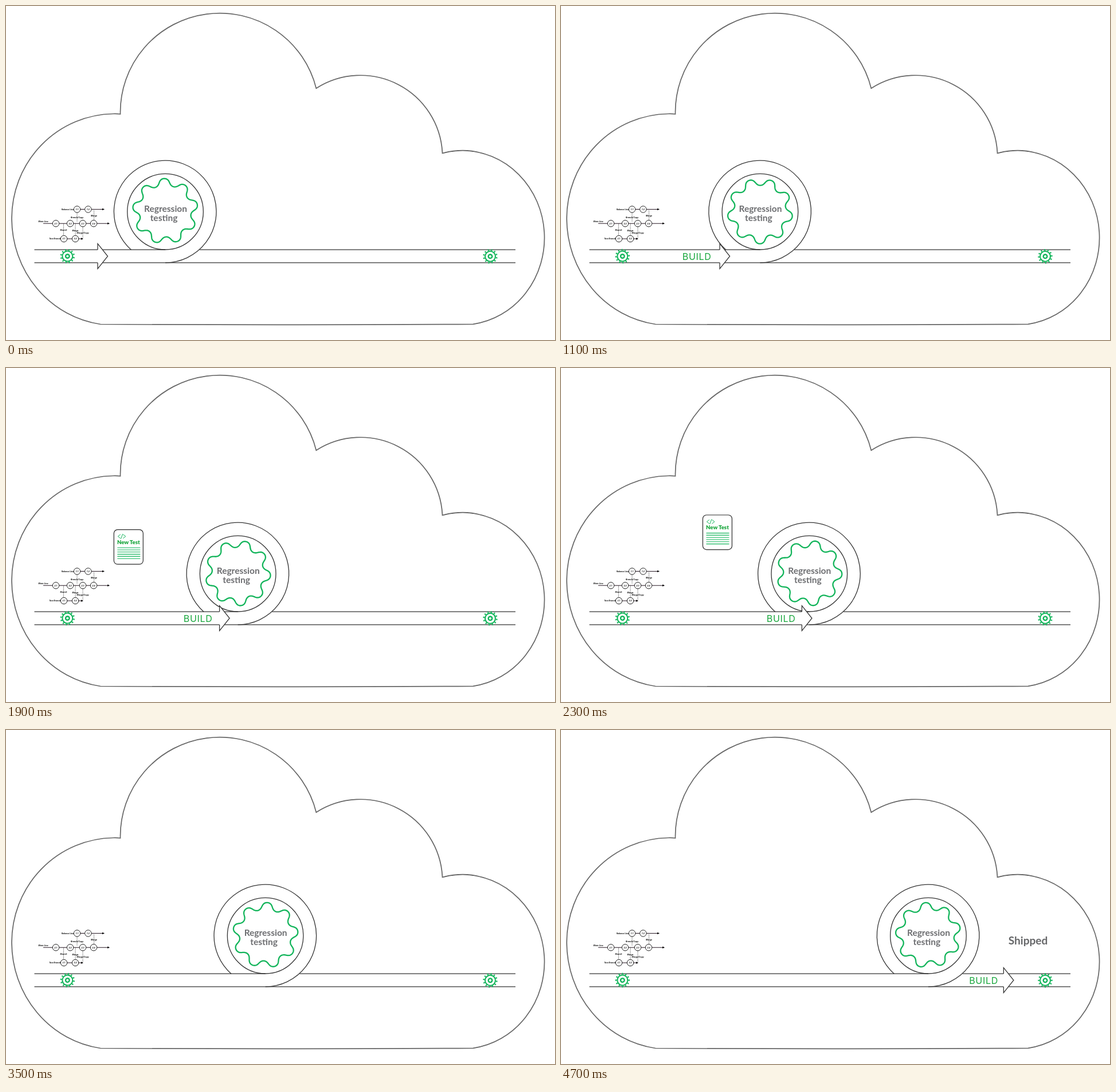
An HTML page that plays this animation: 958 px wide and 584 px high, repeating every 4800 ms.

```html
<!DOCTYPE html>
<html lang="en">
<head>
<meta charset="utf-8">
<title>Build pipeline</title>
<style>
  html, body { margin: 0; width: 100%; height: 100%; overflow: hidden; background: #fff; }
  svg { display: block; width: 958px; height: 584px; }
  .line { fill: none; stroke: #333; stroke-width: 1.3; }
  .cloud { fill: none; stroke: #666; stroke-width: 1.7; }
  .green { fill: none; stroke: #12b45a; }
  .label { font: 700 15.5px Lato, sans-serif; fill: #6d6e71; text-anchor: middle; }
  .shipped { font-size: 19px; fill: #666769; }
  .build { font: 400 16px Inter, sans-serif; letter-spacing: .7px; fill: #18a63c; }
  .tiny { font: italic 700 3.7px "Open Sans", sans-serif; fill: #111; text-anchor: middle; }
  .title { font: 900 9.6px Lato, sans-serif; fill: #18a63c; text-anchor: middle; }
</style>
</head>
<body>
<svg viewBox="0 0 958 584">
  <defs>
    <g id="cog" class="green">
      <circle r="9" stroke-width="2.1"/>
      <circle r="3.3" stroke-width="2.4"/>
      <circle r="11.3" stroke-width="2.8" pathLength="120" stroke-dasharray="3.4 6.6" stroke-dashoffset="-3.3"/>
    </g>
    <g id="doc">
      <rect x="-25.5" y="-30.3" width="51" height="60.6" rx="6.5" fill="#fff" stroke="#2a2a2a" stroke-width="1.2"/>
      <path class="green" d="M-14-22l-4.5 3.5 4.5 3.5M-13.2-14.3l3-8.4M-9.5-22l4.5 3.5-4.5 3.5"/>
      <text class="title" y="-5">New Test</text>
      <path class="green" d="M-19.5 1.3h40m-40 3.8h40m-40 3.8h40m-40 3.8h40m-40 3.8h40m-40 3.8h40" stroke-width="1.1"/>
    </g>
  </defs>

  <path class="cloud" d="M165 556.5A180 187 0 0 1 10 372A180 183 0 0 1 187 188.5Q194 188.3 199.5 189
    A173.5 173.5 0 0 1 541.3 144A143 143 0 0 1 761.5 257.5
    A144 152.5 0 0 1 797 252.7A144 152.5 0 0 1 815 556.3Q490 558.5 165 556.5Z"/>

  <g id="branches"></g>

  <path class="line" d="M49.5 448.8H889"/>
  <path class="line" id="pipe"/>
  <g id="wheel">
    <path class="line" d="M-59.7 426.2A89.3 89.3 0 1 1 0 448.8"/>
    <circle class="line" cy="359.7" r="66.3"/>
    <path class="green" id="gear" stroke-width="2.3"/>
    <text class="label" x=".5" y="360">Regression</text>
    <text class="label" x="-2.5" y="376">testing</text>
  </g>
  <use href="#cog" id="cogA"/>
  <use href="#cog" id="cogB"/>
  <g id="arrow">
    <path d="M0-22L17.5 0 0 22Z" fill="#fff"/>
    <path class="line" d="M0-11.4V-22L17.5 0 0 22V11.4"/>
  </g>
  <text class="build" id="build" y="443.5">BUILD</text>
  <use href="#doc" id="docA"/>
  <use href="#doc" id="docB"/>
  <text class="label shipped" id="shipped" x="815" y="375">Shipped</text>
</svg>

<script>
const $ = id => document.getElementById(id);
const LOOP = 4800, STEP = 100;
const LOOP_IN = 2570, LOOP_OUT = 3290, EXIT = 3600; // arrow enters the ring, completes it, reappears
const HUB = { x: 452.6, y: 359.7, r: 77.5 };        // ring while it rests

const clamp = v => Math.min(1, Math.max(0, v));
const progress = (t, from, to) => clamp((t - from) / (to - from));
const mix = (a, b, p) => a + (b - a) * p;

function place(id, x, y, angle = 0) {
  $(id).setAttribute('transform', `translate(${x} ${y}) rotate(${angle})`);
}

function gearPath() {
  let d = '';
  for (let i = 0; i < 360; i++) {
    const a = i * Math.PI / 180;
    const r = 51 + 6 * Math.cos(9 * a);
    const b = a + 0.018 * Math.sin(18 * a); // steeper flanks
    d += `${i ? 'L' : 'M'}${(r * Math.sin(b)).toFixed(2)} ${(-r * Math.cos(b)).toFixed(2)}`;
  }
  return d + 'Z';
}

function branchesSvg() {
  const text = (x, y, s) => `<text class="tiny" x="${x}" y="${y}">${s}</text>`;
  const link = (x, y0, y1, s) =>
    `<path d="M${x} ${y0}V${y1}" stroke="#444" stroke-width=".8" stroke-dasharray="1.5 1"/>` +
    text(x, (y0 + y1) / 2 + 1.5, s);
  const node = (x, y, s) =>
    `<circle cx="${x}" cy="${y}" r="5.7" fill="#fff" stroke="#222"/>` + text(x, y + 1.3, s);
  const rail = (x0, x1, y, row, nodes) =>
    `<path d="M${x0} ${y}H${x1}" stroke="#2a1a26" stroke-width="1.1"/><path d="M${x1 + 1} ${y}l-4-1.7v3.4z"/>` +
    nodes.map((x, i) => node(x, y, `${row}.${i + 1}`)).join('');
  return link(124, 361, 377, 'Branch/Copy') + link(153.5, 357, 375, 'Merge') +
    link(100.5, 381, 401, 'Branch') + link(121, 381, 403, 'Merge') + link(134, 386, 406, 'Merge/Copy') +
    rail(118, 171, 355.5, 1, [124, 143.3]) + rail(65, 180, 380.3, 2, [87, 112, 134, 153]) +
    rail(95, 134, 407, 3, [101, 121]) +
    text(107.5, 356.5, 'Release Line') + text(65, 377.5, 'Main Line') + text(85.5, 408, 'Test Branch');
}

function drawWheel(t) {
  const x = mix(278, HUB.x, progress(t, 130, LOOP_IN)) + 206 * progress(t, 3635, LOOP);
  place('wheel', x, 0);
  $('pipe').setAttribute('d', `M49.5 426.2H${x}M${x + 59.7} 426.2H889`);
}

function drawGears(t) {
  const angle = 0.093 * t - 2;
  place('gear', 0, 358.7, angle);
  place('cogA', 107.3, 437.5, angle);
  place('cogB', 845, 437.8, angle);
}

// In along the pipe, once around the ring, then out to the right
function drawBuild(t) {
  const out = progress(t, EXIT, LOOP);
  if (t > LOOP_IN && t < LOOP_OUT) {
    const a = 2 * Math.PI * progress(t, LOOP_IN, LOOP_OUT);
    place('arrow', HUB.x + HUB.r * Math.sin(a), HUB.y + HUB.r * Math.cos(a), -a * 180 / Math.PI);
  } else {
    place('arrow', out ? mix(556, 792, out) : mix(160, HUB.x, progress(t, 120, LOOP_IN)), 437.5);
  }
  const shown = t < LOOP_IN || t > EXIT;
  $('arrow').style.opacity = +(shown || t < LOOP_OUT);
  $('build').setAttribute('x', out ? mix(505, 731, out) : 77 + 0.1225 * t);
  $('build').style.opacity = shown ? progress(t, 300, 600) : 0;
}

// A new test arcs from the branches into the wheel
function drawDoc(id, t, start, apex) {
  const end = 3430;
  const x = mix(165, 440, progress(t, start, end));
  place(id, x, apex + 0.0033 * (x - 309) ** 2);
  $(id).style.opacity = Math.min(progress(t, start, start + 150), progress(t, end, end - 100));
}

function draw(t) {
  drawWheel(t);
  drawGears(t);
  drawBuild(t);
  drawDoc('docA', t, 1570, 283);
  drawDoc('docB', t, 2440, 272);
  $('shipped').style.opacity = +(t >= 3800);
}

$('gear').setAttribute('d', gearPath());
$('branches').innerHTML = branchesSvg();

// The motion advances ten times a second; the small lead absorbs display delay
const begin = performance.now();
function tick() {
  const t = (performance.now() - begin + 20) % LOOP;
  draw(Math.floor(t / STEP) * STEP);
  requestAnimationFrame(tick);
}
tick();
</script>
</body>
</html>
```
